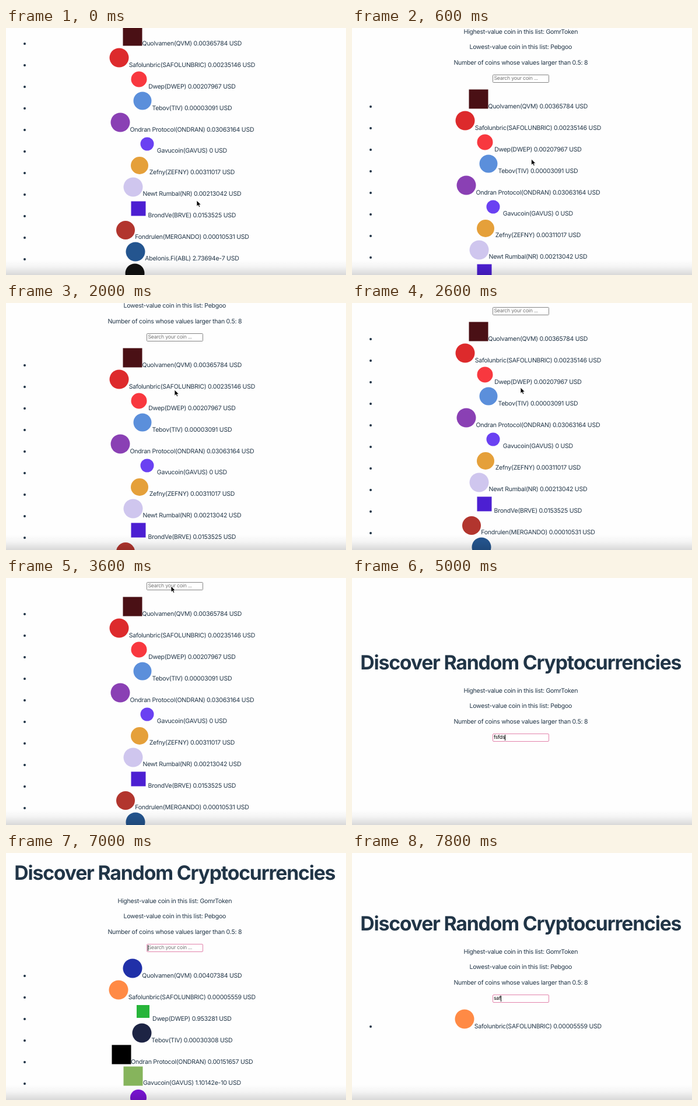
These frames come from a looping animation (583 px wide and 424 px high, 8 s). An HTML page:

```html
<!DOCTYPE html>
<html lang="en">
<head>
<meta charset="utf-8">
<title>Discover Random Cryptocurrencies</title>
<style>
  html, body { margin: 0; width: 100%; height: 100%; overflow: hidden; background: #fefefe; }
  #stage {
    position: relative; width: 583px; height: 424px; overflow: hidden; color: #213547;
    font: 10.56px Inter, "Liberation Sans", sans-serif; letter-spacing: -.024em;
    font-optical-sizing: none; text-rendering: geometricPrecision;
  }
  #page { position: absolute; left: 0; top: 0; width: 578.6px; }
  #list { position: absolute; left: 0; top: .7px; width: 100%; }
  .line {
    position: absolute; left: 0; width: 100%; height: 0; line-height: 0; white-space: pre;
    display: flex; align-items: center; justify-content: center;
  }
  h1.line { margin: 0; font-size: 33.8px; font-weight: 700; letter-spacing: -.0355em; }
  .row { left: 26.4px; width: 552px; }
  .row::before {
    content: ""; position: absolute; left: 3.7px; top: -1.4px;
    width: 3.8px; height: 3.8px; border-radius: 50%; background: #213547;
  }
  .icon { position: relative; flex: none; width: 33px; height: 0; }
  .icon b { position: absolute; left: 16.5px; top: -12.5px; transform: translate(-50%, -50%); }
  #search {
    position: absolute; left: 240.8px; top: -54px; width: 97px; height: 14px; box-sizing: border-box;
    border: 1px solid #858585; border-radius: 1.5px; padding-left: 1.6px; background: #fff;
    display: flex; align-items: center; font-size: 8.8px; line-height: 0; white-space: pre; color: #000;
  }
  #search.focus { border: 1.5px solid #e283ab; border-radius: 2px; padding-left: 1.1px; }
  #search.empty { color: #757575; }
  #caret { width: .8px; height: 10px; background: #000; }
  #fade {
    position: absolute; left: 0; bottom: 0; width: 100%; height: 26px;
    background: linear-gradient(rgba(0,0,0,0), rgba(0,0,0,.04) 45%, rgba(0,0,0,.15));
  }
  #cursor { position: absolute; left: 0; top: 0; overflow: visible; }
</style>
</head>
<body>
<div id="stage">
  <div id="page">
    <h1 class="line" style="top:-175.5px">Discover Random Cryptocurrencies</h1>
    <div class="line" style="top:-127px">Highest-value coin in this list: GomrToken</div>
    <div class="line" style="top:-100.6px">Lowest-value coin in this list: Pebgoo</div>
    <div class="line" style="top:-74.2px">Number of coins whose values larger than 0.5: 8</div>
    <div id="search"></div>
    <div id="list"></div>
  </div>
  <div id="fade"></div>
  <svg id="cursor" width="9" height="13">
    <path d="M0 0V10.2L2.4 8 4 11.6 5.8 10.8 4.3 7.4H7.5Z" fill="#000" stroke="#fff" stroke-width=".8"/>
  </svg>
</div>
<script>
const LOOP = 8000, STEP = 200, ROW = 36.96, TOP = 210;
const $ = id => document.getElementById(id);

const names = [
  'Quolvamen(QVM)', 'Safolunbric(SAFOLUNBRIC)', 'Dwep(DWEP)', 'Tebov(TIV)',
  'Ondran Protocol(ONDRAN)', 'Gavucoin(GAVUS)', 'Zefny(ZEFNY)', 'Newt Rumbal(NR)',
  'BrondVe(BRVE)', 'Fondrulen(MERGANDO)', 'Abelonis.Fi(ABL)', 'Fenwolpin(FWP)',
  'Plufado(PLF)', 'Korsavel(KSV)'
];
// price, icon colour, icon size, square icon
const firstCoins = [
  ['0.00365784', '#4a1015', 33, true], ['0.00235146', '#dd2a2c', 33], ['0.00207967', '#f8383f', 27],
  ['0.00003091', '#5b8fdb', 31], ['0.03063164', '#8a40b4', 33], ['0', '#6a41f2', 23],
  ['0.00311017', '#e5a03a', 30], ['0.00213042', '#cfc6ee', 33], ['0.0153525', '#4c1fd2', 25, true],
  ['0.00010531', '#b2352e', 32], ['2.73694e-7', '#24558f', 33], ['0.00142906', '#111111', 33],
  ['0.00071328', '#4aa58c', 33], ['0.00118204', '#5c6f8a', 33]
];
const secondCoins = [
  ['0.00407384', '#2030a8', 33], ['0.00005559', '#ff8a45', 33], ['0.953281', '#27b53a', 22, true],
  ['0.00030308', '#1d2444', 33], ['0.00151657', '#000000', 33, true], ['1.10142e-10', '#86b45c', 33, true],
  ['0.00264913', '#7a14d6', 28]
];

const typing = [
  [0, ''], [4000, 'f'], [4400, 'fs'], [4600, 'fsf'], [4800, 'fsfd'], [5000, 'fsfds'],
  [5400, 'fsfd'], [5600, 'fsf'], [5800, 'fs'], [6000, 'f'], [6200, ''],
  [7200, 's'], [7600, 'sa'], [7800, 'saf']
];
const scrollKeys = [
  [0, 184], [200, 172], [600, 76], [1000, 8], [1200, .8], [1400, 14],
  [2000, 104], [2400, 148], [2600, 149], [4399, 149], [4400, 0]
];
const cursorX = [[0, 327], [1200, 288], [2000, 289], [2600, 289], [3600, 283]];
const cursorY = [[0, 296], [200, 292], [1000, 158], [1200, 152], [2000, 149], [2600, 145], [3600, 14]];

function valueAt(keys, t) {
  const next = keys.findIndex(key => key[0] > t);
  if (next < 0) return keys[keys.length - 1][1];
  const [t0, a] = keys[next - 1], [t1, b] = keys[next];
  return a + (b - a) * (t - t0) / (t1 - t0);
}

function rowHtml({ text, coin: [, color, size, square] }, i) {
  const style = `width:${size}px;height:${size}px;background:${color};border-radius:${square ? 0 : '50%'}`;
  return `<div class="line row" style="top:${i * ROW}px">` +
    `<span class="icon"><b style="${style}"></b></span>${text}</div>`;
}

// Short pages are centred; long ones scroll as far as their rows reach.
function firstRowY(count, scroll) {
  if (!count) return 321;
  const centred = 297 - (count - 1) * ROW / 2;
  return centred >= TOP ? centred : Math.max(TOP - scroll, 2 * centred - TOP);
}

function draw(t) {
  const query = typing.filter(key => key[0] <= t).pop()[1];
  const focused = t >= 3800;
  const rows = names.map((name, i) => {
    const coin = t >= 5400 && secondCoins[i] || firstCoins[i];
    return { coin, text: `${name} ${coin[0]} USD` };
  }).filter(row => row.text.toLowerCase().includes(query));

  $('list').innerHTML = rows.map(rowHtml).join('');
  $('page').style.top = firstRowY(rows.length, valueAt(scrollKeys, t)) + 'px';

  const caret = focused ? '<span id="caret"></span>' : '';
  $('search').className = (focused ? 'focus ' : '') + (query ? '' : 'empty');
  $('search').innerHTML = query ? query + caret : caret + 'Search your coin ...';

  $('cursor').style.display = t < 4000 ? '' : 'none';
  $('cursor').style.transform = `translate(${valueAt(cursorX, t)}px, ${valueAt(cursorY, t)}px)`;
}

const start = performance.now();
let shown = -1;
function tick() {
  const elapsed = (performance.now() - start) % LOOP;
  const t = Math.floor(elapsed / STEP) * STEP;
  if (t !== shown) draw(shown = t);
  requestAnimationFrame(tick);
}
tick();
</script>
</body>
</html>
```
